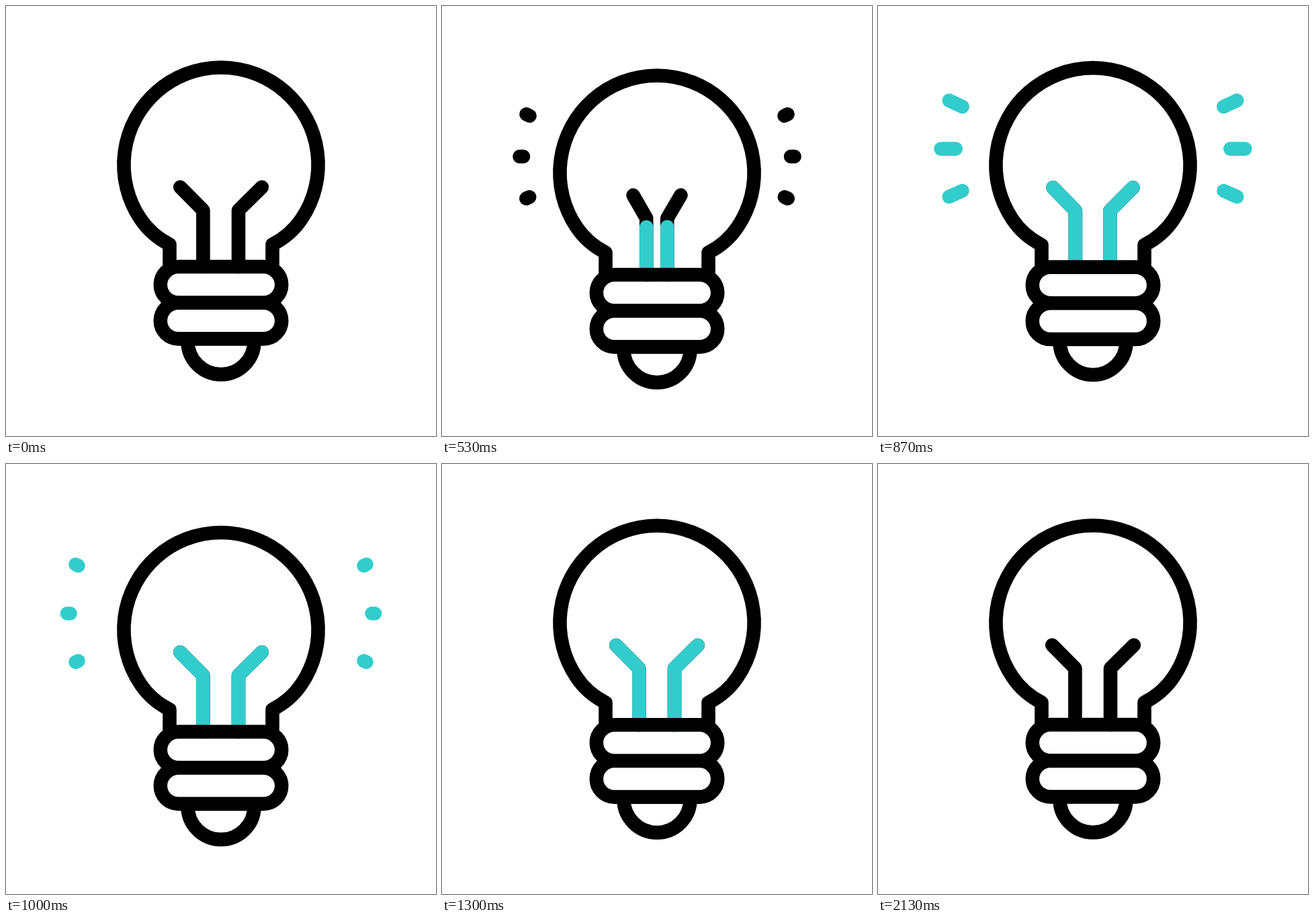
Animation, 640 px wide and 640 px high, one loop 2500 ms. Source, as an HTML page with a canvas:

```html
<!DOCTYPE html>
<html>
<head>
<meta charset="utf-8">
<title>Light bulb</title>
<style>
html, body { margin: 0; overflow: hidden; background: #fff; }
canvas { display: block; }
</style>
</head>
<body>
<canvas width="640" height="640"></canvas>
<script>
const ctx = document.querySelector('canvas').getContext('2d');
const BLACK = '#000', TEAL = '#33cccc';
const LOOP = 2500, FPS = 30;

const bulb = new Path2D(`
  M243.5 388V355Q216 341 200 316.8A144.6 144.6 0 1 1 440 316.8Q424 341 396.5 355V388
  M270.5 496V498.9A49.5 49.5 0 0 0 369.5 498.9V496`);
bulb.roundRect(229.8, 388, 180.4, 53.6, 26.8);
bulb.roundRect(229.8, 441.6, 180.4, 53.8, 26.8);

// Left-hand rays, from the inner end outwards
const rays = [
  [[130.5, 151.5], [103.5, 139]],
  [[121, 212], [91, 212]],
  [[130.2, 272.3], [103.5, 284.3]]
];

// Eased progress from 0 to 1 between two frame positions
function ease(frame, from, to) {
  const u = Math.min(1, Math.max(0, (frame - from) / (to - from)));
  return u * u * (3 - 2 * u);
}

const pulse = (frame, start, peak, end) => ease(frame, start, peak) - ease(frame, peak, end);

const mirror = points => points.map(([x, y]) => [640 - x, y]);

// Strokes the part of a polyline between two fractions of its length
function strokePart(points, color, from = 0, to = 1) {
  if (to - from < 0.001) return;
  let length = 0;
  ctx.beginPath();
  points.forEach(([x, y], i) => {
    ctx.lineTo(x, y);
    if (i) length += Math.hypot(x - points[i - 1][0], y - points[i - 1][1]);
  });
  ctx.setLineDash([length * (to - from), 999]);
  ctx.lineDashOffset = -length * from;
  ctx.strokeStyle = color;
  ctx.stroke();
  ctx.setLineDash([]);
}

function drawRays(frame, color) {
  const tail = ease(frame, 17.8, 26), head = ease(frame, 14, 21.3);
  for (const ray of rays) {
    strokePart(ray, color, tail, head);
    strokePart(mirror(ray), color, tail, head);
  }
}

function drawFilament(frame) {
  const squeeze = pulse(frame, 9, 20.2, 26.7);
  const lit = pulse(frame, 9.3, 21.5, 1e9) - ease(frame, 52, 64);
  const stem = 293.4 + 15.8 * squeeze;
  const left = [[stem, 388], [stem, 304], [259.2 + 37 * squeeze, 269.6]];
  const right = mirror(left).map(([x, y]) => [x - 0.6 * (x < 350), y]);
  for (const wire of [left, right]) {
    strokePart(wire, BLACK);
    strokePart(wire, TEAL, 0, lit);
  }
}

function draw(now) {
  const frame = Math.floor((now % LOOP + 5) * FPS / 1000);
  const drop = 23 * (pulse(frame, 12.3, 19.5, 26.7) + pulse(frame, 26.7, 33.7, 39.3));
  ctx.setTransform(1, 0, 0, 1, 0, 0);
  ctx.fillStyle = '#fff';
  ctx.fillRect(0, 0, 640, 640);
  ctx.translate(0, drop);
  ctx.lineWidth = 20.6;
  ctx.lineCap = ctx.lineJoin = 'round';
  drawRays(frame, BLACK);
  drawRays(frame - 6, TEAL);
  drawFilament(frame);
  ctx.strokeStyle = BLACK;
  ctx.stroke(bulb);
}

const start = performance.now();
(function tick() {
  draw(performance.now() - start);
  requestAnimationFrame(tick);
})();
</script>
</body>
</html>
```
